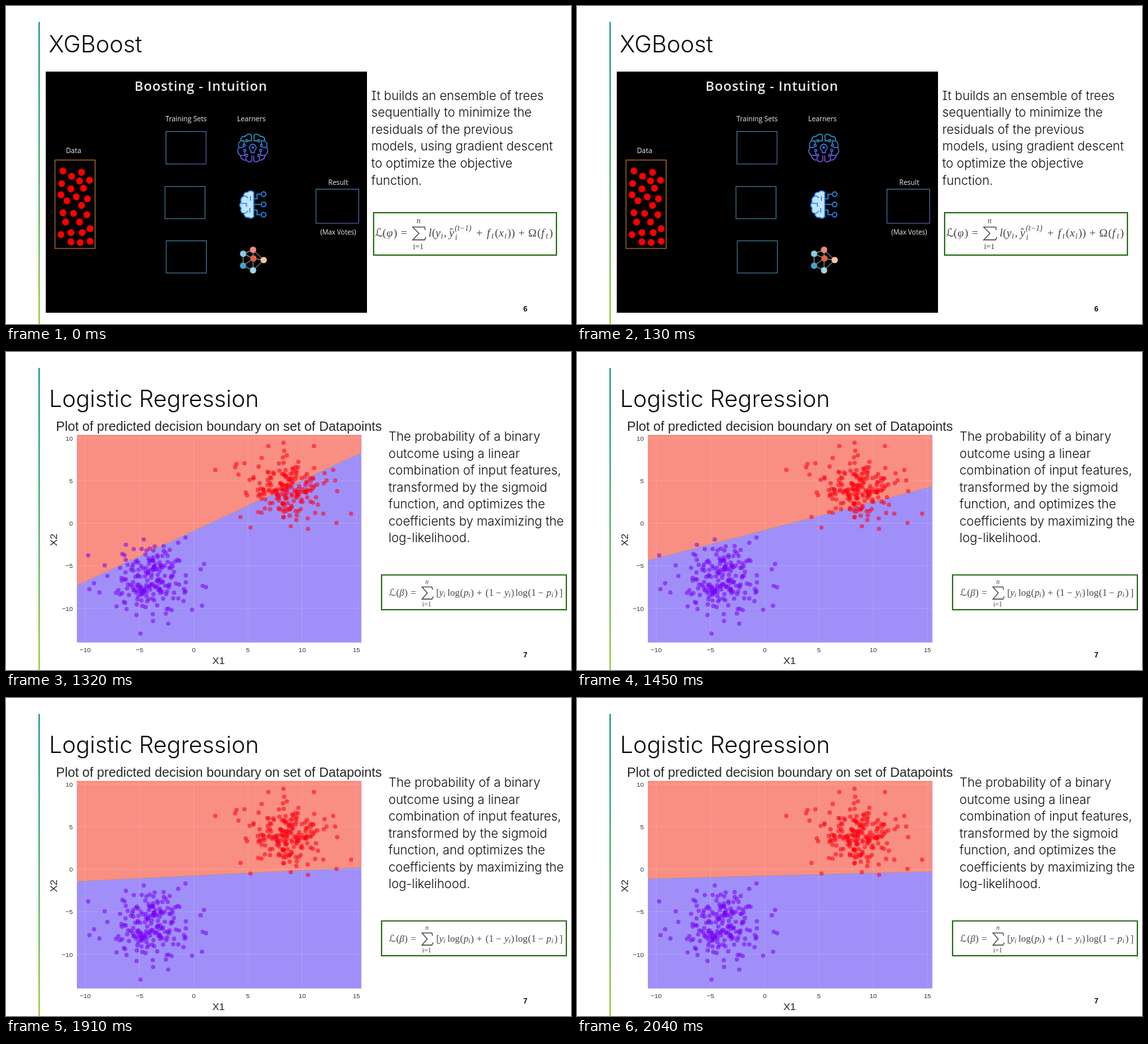
These frames come from a looping animation (853x480 px, 2170 ms). An HTML page:

```html
<!DOCTYPE html>
<html lang="en">
<head>
<meta charset="utf-8">
<title>Model slides</title>
<style>
html, body { margin: 0; width: 100%; height: 100%; overflow: hidden; background: #fff; }
svg { display: block; width: 853px; height: 480px; }
.title { font: 300 35px Inter, sans-serif; fill: #0c0c0c; }
.body { font: 300 18.8px Inter, sans-serif; font-feature-settings: "cv08"; fill: #0c0c0c; }
.page { font: bold 11px "Liberation Sans", sans-serif; text-anchor: middle; }
.head { font: 600 20px "Open Sans", sans-serif; letter-spacing: .8px; fill: #ececec; }
.label { font: 10.5px "Open Sans", sans-serif; fill: #eee; text-anchor: middle; }
.plot { font: 19.85px "Liberation Sans", sans-serif; fill: #262626; }
.axis { font: 15.5px "Liberation Sans", sans-serif; fill: #262626; text-anchor: middle; }
.tick { font: 9.8px "Liberation Sans", sans-serif; fill: #333; }
.math { font-family: "Liberation Serif", "DejaVu Sans", serif; fill: #444; }
.it { font-style: italic; }
.frame { fill: none; stroke: #2f7420; stroke-width: 2; }
</style>
</head>
<body>
<svg viewBox="0 0 853 480" xmlns="http://www.w3.org/2000/svg">
  <defs>
    <linearGradient id="bar" x1="0" y1="24" x2="0" y2="480" gradientUnits="userSpaceOnUse">
      <stop stop-color="#12968c"/><stop offset=".5" stop-color="#45ab66"/><stop offset="1" stop-color="#96cb3a"/>
    </linearGradient>
    <linearGradient id="brain" x1="0" y1="-23" x2="0" y2="23" gradientUnits="userSpaceOnUse">
      <stop stop-color="#25b5c4"/><stop offset=".5" stop-color="#4379e4"/><stop offset="1" stop-color="#8a48ee"/>
    </linearGradient>
    <linearGradient id="edge" x2="1" y2="1">
      <stop stop-color="#3f86a6"/><stop offset="1" stop-color="#5a58ae"/>
    </linearGradient>
    <clipPath id="area"><rect x="107" y="125" width="429.5" height="313.5"/></clipPath>
  </defs>
  <rect width="853" height="480" fill="#fff"/>
  <rect x="49" y="24" width="2" height="456" fill="url(#bar)"/>

  <g id="boost">
    <text class="title" x="64.5" y="70">XGBoost</text>
    <rect x="60" y="99" width="485" height="364"/>
    <text class="head" x="194" y="128">Boosting - Intuition</text>
    <g class="label">
      <text x="102" y="222">Data</text>
      <text x="272" y="174">Training Sets</text>
      <text x="370.5" y="174">Learners</text>
      <text x="501.5" y="269.5">Result</text>
      <text x="501.5" y="345" font-size="10" style="font-size:10px">(Max Votes)</text>
    </g>
    <g fill="none" stroke="url(#edge)" stroke-width="1.1">
      <rect x="74" y="232.5" width="60.5" height="133.5" stroke="#b9793a"/>
      <rect x="241.5" y="189.5" width="60.5" height="49"/>
      <rect x="240" y="272.5" width="60.5" height="48.5" stroke="#3d8197"/>
      <rect x="242" y="354.5" width="60.5" height="48.5" stroke="#3d8197"/>
      <rect x="468" y="276.5" width="64.5" height="51.5"/>
    </g>
    <g id="data" fill="#fd0000"></g>

    <g transform="translate(372.5 214.5)" fill="none" stroke="url(#brain)" stroke-width="1.4">
      <g id="half">
        <path d="M-2-20Q-7-23-11-18Q-19-18-18-11Q-23-8-21-1Q-25 6-19 11Q-17 19-10 18Q-6 23-1.5 19V11"/>
        <path d="M-2-20V-11H-7M-18-11H-13V-6M-21-1H-14M-19 11H-12V5M-10 18V13"/>
        <circle cx="-9" cy="-11" r="1.7"/><circle cx="-13" cy="-4" r="1.7"/>
        <circle cx="-12" cy="3.5" r="1.7"/><circle cx="-9" cy="11" r="1.7"/>
      </g>
      <use href="#half" transform="scale(-1 1)"/>
      <path d="M-2.5 7V4Q-6 1-5-2Q-3-6 0-6Q3-6 5-2Q6 1 2.5 4V7Z"/>
      <circle cy="-1" r="1.2"/>
    </g>

    <g stroke="#2a8df0" stroke-width="1.6" fill="none">
      <path fill="#c4e4fd" d="M374 281Q369 277 365 281Q358 281 359 287Q353 290 355 296Q351 301 355 305Q353 312 359 313Q360 320 366 319Q371 322 374 318Z"/>
      <path d="M374 291H379V284H385M374 299.5H385M374 308H379V315H385M359 287Q363 286 365 290M355 298H363V303M359 313Q363 313 365 309M369 287V294M368 312V305"/>
      <circle cx="389" cy="284" r="3.5"/><circle cx="389" cy="299.5" r="3.5"/><circle cx="389" cy="315" r="3.5"/>
    </g>

    <path d="M373 368L358 374V392L373 399L389 383.500L373 368V399M358 374L373.500 381L389 383.500M373.500 381L358 392" fill="none" stroke="#a9b4bb" stroke-width="1"/>
    <g id="net"></g>

    <g id="boostText" class="body"></g>
    <rect class="frame" x="555" y="312" width="276" height="64"/>
    <g id="loss" class="math"></g>
    <text class="page" x="784" y="461">6</text>
  </g>

  <g id="logit">
    <text class="title" x="65" y="83">Logistic Regression</text>
    <text class="plot" x="75.500" y="119">Plot of predicted decision boundary on set of Datapoints</text>
    <g clip-path="url(#area)">
      <rect x="107" y="125" width="430" height="314" fill="#a08ff9"/>
      <path id="upper" fill="#f98e83"/>
      <path id="cut" fill="none" stroke="#8f9a80" stroke-width="1" stroke-dasharray="3 1.500" opacity=".75"/>
      <g id="grid" stroke="#fff" stroke-opacity=".15"></g>
    </g>
    <g id="red" fill="#ff0010" fill-opacity=".55"></g>
    <g id="violet" fill="#7a00f5" fill-opacity=".55"></g>
    <g id="ticks" class="tick"></g>
    <text class="axis" x="321" y="470.500">X1</text>
    <text class="axis" transform="translate(77 283.500) rotate(-90)">X2</text>
    <g id="logitText" class="body"></g>
    <rect class="frame" x="567" y="336.500" width="279" height="52.500"/>
    <g id="likely" class="math"></g>
    <text class="page" x="784" y="461">7</text>
  </g>
</svg>
<script>
const $ = id => document.getElementById(id);
const add = (parent, tag, attrs, text) => {
  const el = document.createElementNS("http://www.w3.org/2000/svg", tag);
  for (const k in attrs) el.setAttribute(k, attrs[k]);
  if (text) el.textContent = text;
  return $(parent).appendChild(el);
};
const dots = (id, pts, r) => {
  for (let i = 0; i < pts.length; i += 2) add(id, "circle", { cx: pts[i], cy: pts[i + 1], r });
};
const lines = (id, x, y, step, rows) =>
  rows.forEach((row, i) => add(id, "text", { x, y: y + i * step }, row));

lines("boostText", 551.5, 141.5, 25.65, [
  "It builds an ensemble of trees", "sequentially to minimize the",
  "residuals of the previous", "models, using gradient descent",
  "to optimize the objective", "function."]);
lines("logitText", 577.5, 134, 25.55, [
  "The probability of a binary", "outcome using a linear",
  "combination of input features,", "transformed by the sigmoid",
  "function, and optimizes the", "coefficients by maximizing the", "log-likelihood."]);

dots("data", [
  86, 249, 114, 251, 99, 257, 111, 264, 126, 263, 84, 268, 98, 276, 117, 275, 83, 285,
  106, 288, 123, 291, 92, 294, 114, 301, 86, 312, 102, 313, 122, 315, 90, 326, 111, 326,
  127, 336, 83, 345, 98, 342, 115, 342, 98, 356, 112, 357, 127, 355], 5.2);
[[373, 368, "#ec8a7c"], [358, 374, "#8cc9df"], [373.5, 381, "#e2603f"],
 [389, 383.5, "#f5c596"], [358, 392, "#4f9fc4"], [373, 399, "#a5d3e6"]]
  .forEach(([cx, cy, fill]) => add("net", "circle", { cx, cy, r: 4.8, fill }));

// Formula pieces: [x, text, kind, dy]; i = italic, r = roman, s = small italic, n = small roman
function formula(id, base, size, parts) {
  for (const [x, text, kind, dy = 0] of parts) {
    const small = kind === "s" || kind === "n";
    add(id, "text", {
      x, y: base + dy, "font-size": small ? size * 0.7 : size,
      class: kind === "i" || kind === "s" ? "it" : ""
    }, text);
  }
}
const sigma = (id, x, y, w, h) => add(id, "path", {
  d: `M${x + w - 1} ${y + h * .24}L${x + w - 2} ${y + .6}H${x + 1}L${x + w * .5} ${y + h * .49}L${x + 1} ${y + h - 1}H${x + w - 2}L${x + w} ${y + h * .75}`,
  fill: "none", stroke: "#444", "stroke-width": 1.3
});

sigma("loss", 613, 333, 21, 21);
formula("loss", 348, 17, [
  [557, "ℒ", "r"], [568.5, "(", "r"], [574.5, "φ", "i"], [585, ")", "r"], [596, "=", "r"],
  [620, "n", "s", -20], [614.5, "i=1", "n", 18.5],
  [638, "l", "i"], [643, "(", "r"], [648.5, "y", "i"], [656.5, "i", "s", 3], [661, ",", "r"],
  [669, "y", "i"], [669.5, "ˆ", "r", -1], [677.5, "(t−1)", "s", -9], [678, "i", "s", 5],
  [710, "+", "r"], [726, "f", "i"], [733, "t", "s", 3], [738, "(", "r"], [744, "x", "i"],
  [752.5, "i", "s", 3], [757, "))", "r"], [773.5, "+", "r"], [788.5, "Ω", "r"],
  [802, "(", "r"], [808, "f", "i"], [815, "t", "s", 3], [820, ")", "r"]]);

sigma("likely", 627, 354, 18, 20);
formula("likely", 367.5, 14.5, [
  [578, "ℒ", "r"], [589, "(", "r"], [594, "β", "i"], [601.5, ")", "r"], [611, "=", "r"],
  [633, "n", "s", -18], [628.5, "i=1", "n", 16.5],
  [649.5, "[", "r"], [654, "y", "i"], [660.5, "i", "s", 2.5], [666.5, "log", "r"],
  [685.5, "(", "r"], [691, "p", "i"], [698, "i", "s", 2.5], [701.5, ")", "r"],
  [710.5, "+", "r"], [724, "(", "r"], [729, "1", "r"], [739.5, "−", "r"], [752.5, "y", "i"],
  [759, "i", "s", 2.5], [762.5, ")", "r"], [769, "log", "r"], [788, "(", "r"],
  [793, "1", "r"], [803, "−", "r"], [816, "p", "i"], [823.5, "i", "s", 2.5],
  [828, ")", "r"], [835.5, "]", "r"]]);

const px = x => 283.4 + x * 16.38, py = y => 258.5 - y * 12.85;
const name = v => String(v).replace("-", "−");
for (let v = -10; v <= 15; v += 5) {
  add("grid", "path", { d: `M${px(v)} 125V439` });
  add("ticks", "text", { x: px(v), y: 453, "text-anchor": "middle" }, name(v));
  if (v > 10) continue;
  add("grid", "path", { d: `M107 ${py(v)}H537` });
  add("ticks", "text", { x: 101, y: py(v) + 3.5, "text-anchor": "end" }, name(v));
}

let seed = 11;
const rnd = () => (seed = (seed * 16807) % 2147483647) / 2147483647;
function cloud(id, count, cx, cy, sx, sy, outer) {
  const pts = [...outer];
  while (count) {
    const r = Math.sqrt(-2 * Math.log(rnd())), a = rnd() * Math.PI * 2;
    if (r > 2.1) continue;
    pts.push((cx + sx * r * Math.cos(a)).toFixed(1), (cy + sy * r * Math.sin(a)).toFixed(1));
    count--;
  }
  dots(id, pts, 3.3);
}
cloud("red", 175, 424, 209, 30, 24, [
  316, 178, 419, 137, 396, 142, 465, 142, 348, 169, 360, 168, 351, 185, 346, 174,
  354, 249, 369, 265, 456, 267, 521, 244, 499, 258, 494, 178, 500, 210, 479, 244,
  481, 183, 484, 194, 420, 149, 362, 212, 424, 156, 386, 160, 430, 263, 497, 194]);
cloud("violet", 175, 222, 343, 30, 27, [
  124, 307, 203, 425, 245, 410, 299, 320, 302, 355, 296, 383, 126, 358, 141, 363,
  133, 349, 271, 280, 208, 283, 181, 291, 149, 322, 222, 406, 197, 397, 260, 288,
  167, 384, 268, 376, 297, 353, 281, 389, 238, 293, 153, 338, 294, 328, 182, 388]);

// Boundary steps: [start ms, y at left edge, y at right edge]
const steps = [
  [1060, 527.6, -83], [1320, 352.5, 152], [1450, 315, 203],
  [1580, 291.5, 237], [1780, 283, 247], [1910, 277, 256], [2040, 273, 262]];
const LOOP = 2170;
function draw() {
  const t = performance.now() % LOOP;
  const step = steps.filter(s => s[0] <= t).pop();
  $("boost").style.display = step ? "none" : "";
  $("logit").style.display = step ? "" : "none";
  if (step) {
    const edge = `M107 ${step[1]}L536.5 ${step[2]}`;
    $("cut").setAttribute("d", edge);
    $("upper").setAttribute("d", edge + "V-100H107Z");
  }
  requestAnimationFrame(draw);
}
draw();
</script>
</body>
</html>
```
